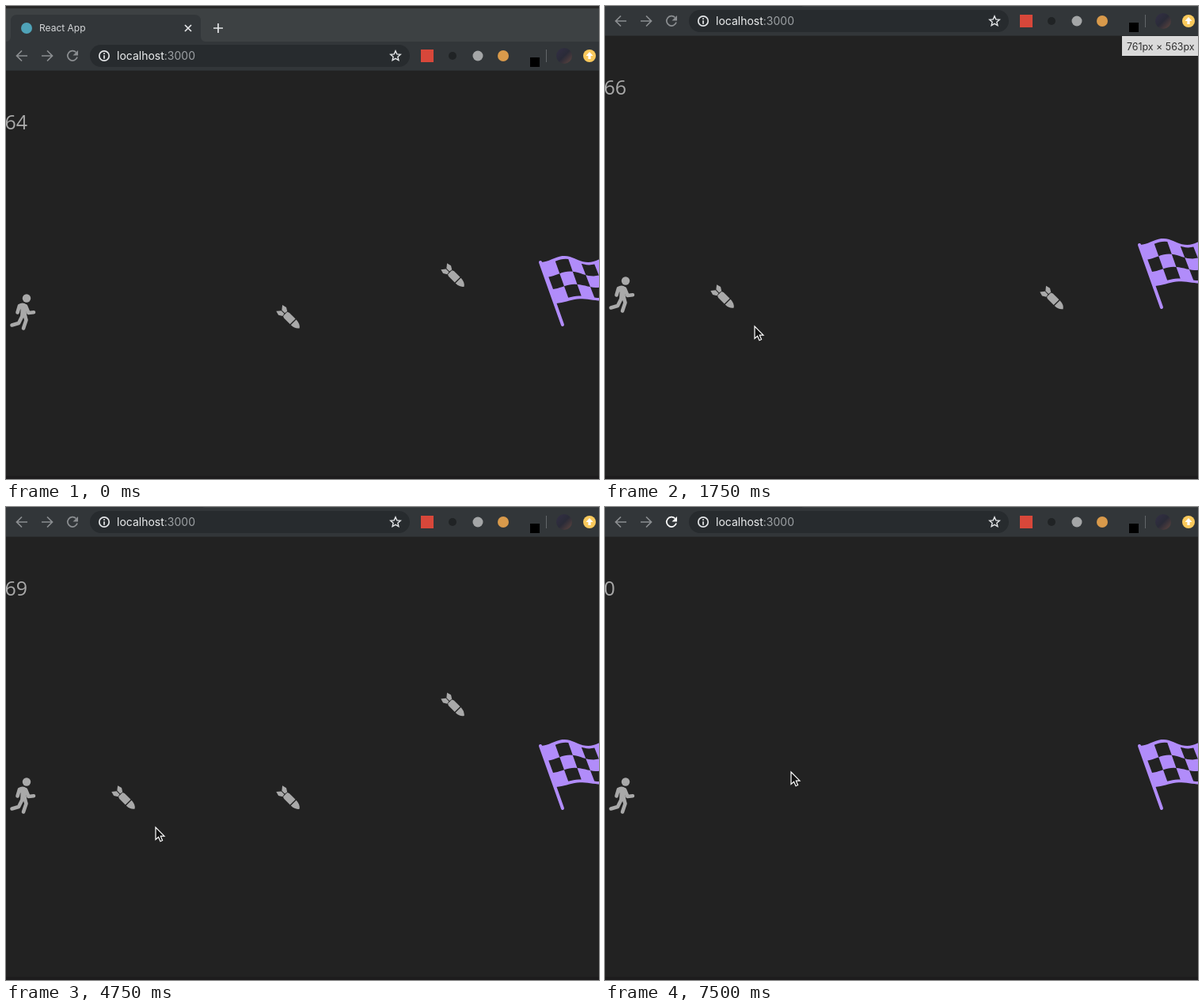
Recreate the animation shown at these times as an HTML page. Size 749 by 598 pixels, loop 8000 ms.

```html
<!DOCTYPE html>
<html>
<head>
<meta charset="utf-8">
<style>
  html, body { margin: 0; width: 100%; height: 100%; overflow: hidden; background: #222; }
  svg { display: block; width: 749px; height: 598px; }
  .ui { font-family: Inter, Roboto, sans-serif; }
  .line { fill: none; stroke: #8b8e91; stroke-width: 1.7; }
  .bright { stroke: #e4e6e8; }
  .limb { fill: none; stroke: #a9a9a9; stroke-width: 4.6; stroke-linecap: round; stroke-linejoin: round; }
</style>
</head>
<body>
<svg viewBox="0 0 749 598">
  <defs>
    <linearGradient id="photo" x2="1" y2="1">
      <stop offset="0" stop-color="#332f45"/>
      <stop offset=".5" stop-color="#2a2b38"/>
      <stop offset="1" stop-color="#61463f"/>
    </linearGradient>
    <g id="bomb" fill="#a9a9a9" transform="rotate(45)">
      <path id="fin" d="M-16-5.5L-10.5-7L-6-4.2L-6.6-.5H-12Z"/>
      <use href="#fin" transform="scale(1 -1)"/>
      <path d="M-5.5-3.6L-3-4.8H8V4.8H-3L-5.5 3.6Z"/>
      <path d="M9.4-4.8Q17-4.6 20 0Q17 4.6 9.4 4.8Z"/>
    </g>
  </defs>
  <rect width="749" height="598" fill="#222"/>
  <rect y="594" width="749" height="4" fill="#1d1c1d"/>

  <g id="game">
    <g id="bombs"></g>
    <g id="runner">
      <circle cx="26" cy="369.5" r="5.2" fill="#a9a9a9"/>
      <path d="M15.5 377.5Q21 373.5 26 377.5L25.500 385L26.500 393.500L18 394L18.500 384Z" fill="#a9a9a9"/>
      <path class="limb" stroke-width="4" d="M17 379L14.500 387.500M25 379.500L28.500 388L35 387.300M24 392L25.500 397L22 407.500M20 393L16 401L7.500 403.500"/>
    </g>
    <g id="flag" fill="#b18cfa">
      <path id="cloth"/>
      <path id="checks" fill="#222"/>
      <path d="M675 324L703 403" stroke="#b18cfa" stroke-width="4" stroke-linecap="round"/>
    </g>
  </g>

  <g id="page">
    <text id="score" x="-1.5" y="156" font-size="25" fill="#a9a9a9" font-family="'Open Sans', 'Noto Sans', sans-serif"></text>
    <g id="tip">
      <rect x="653" y="82" width="96" height="25" fill="#dadada"/>
      <text class="ui" x="659" y="99.500" font-size="12.400" fill="#303030">761px × 563px</text>
    </g>

    <rect width="749" height="46" fill="#3d4143"/>
    <rect id="edge" width="749" height="3" fill="#282828"/>
    <rect y="45" width="749" height="37" fill="#323639"/>
    <rect y="81" width="749" height="1" fill="#2b2e30"/>
    <path d="M0 45Q6 45 6 38V19Q6 11 14 11H238Q246 11 246 19V38Q246 45 252 45Z" fill="#323639"/>
    <circle cx="26" cy="28" r="7" fill="#4fa3b8"/>
    <text class="ui" x="42" y="32.300" font-size="12" fill="#d5d7d9">React App</text>
    <path class="line bright" d="M226 24L234 32M234 24L226 32M262 28H274M268 22V34" stroke-width="1.500"/>

    <path class="line" d="M27 63H14M20 56.500L13.500 63L20 69.500M45 63H58M52 56.500L58.500 63L52 69.500"/>
    <g id="reload">
      <path class="line" d="M88.500 58.500A6.200 6.200 0 1 0 90 64.500"/>
      <path d="M91 56V62.500H84.500Z"/>
    </g>
    <rect x="106" y="49" width="404" height="28" rx="14" fill="#272b2e"/>
    <circle class="line bright" cx="124" cy="63" r="6.200" stroke-width="1.500"/>
    <path class="line bright" d="M124 59.300V61M124 62.300V66.700"/>
    <text class="ui" x="140" y="68" font-size="14" fill="#eceeef">localhost<tspan fill="#9da1a4">:3000</tspan></text>
    <path id="star" class="line bright" style="stroke-width:1.400"/>

    <rect x="524" y="55" width="16" height="16" fill="#d8473a"/>
    <circle cx="564" cy="63" r="5" fill="#202325"/>
    <circle cx="596" cy="63" r="6.500" fill="#a4a6a7"/>
    <circle cx="628" cy="63" r="7" fill="#d99a4b"/>
    <rect x="662" y="65" width="12" height="12" fill="#000"/>
    <path d="M682.500 55V71" stroke="#63676a"/>
    <circle cx="705" cy="63" r="10" fill="url(#photo)"/>
    <circle cx="737" cy="63" r="8" fill="#f9c95c"/>
    <path d="M737 58L741.500 63H738.600V67H735.400V63H732.500Z" fill="#fff"/>
  </g>

  <path id="cursor" d="M0 0V15.500L3.600 12.200L6 17.700L8.600 16.500L6.300 11.200H11Z" fill="#111" stroke="#fff" stroke-width="1.200"/>
</svg>
<script>
const $ = id => document.getElementById(id);
const move = (el, x, y) => el.setAttribute('transform', `translate(${x} ${y})`);
const show = (el, on) => el.setAttribute('visibility', on ? 'visible' : 'hidden');

// Flag cloth: u counts columns away from the pole, v runs 0..1 down the pole.
function clothPoint(u, v) {
  const x = 676 + 16.5 * u;
  const wave = (4 - 2 * v) * Math.sin((x - 690) * Math.PI / 30);
  return `${(x + 19 * v).toFixed(1)} ${(320 - wave + (54 - u) * v).toFixed(1)}`;
}
function patch(u0, v0, u1, v1) {
  const n = Math.ceil((u1 - u0) * 5), top = [], bottom = [];
  for (let i = 0; i <= n; i++) {
    const u = u0 + (u1 - u0) * i / n;
    top.push(clothPoint(u, v0));
    bottom.unshift(clothPoint(u, v1));
  }
  return 'M' + top.concat(bottom).join('L') + 'Z';
}
const rows = [.07, .36, .66, .93];
let checks = '';
for (let c = 0; c < 5; c++)
  for (let r = 0; r < 3; r++)
    if ((c + r) % 2) checks += patch(c ? c : .15, rows[r], c + 1, rows[r + 1]);
$('cloth').setAttribute('d', patch(0, 0, 6, 1));
$('checks').setAttribute('d', checks);

const starPoints = Array.from({length: 10}, (_, i) => {
  const r = i % 2 ? 3 : 6.6, a = i * Math.PI / 5;
  return `${492 + r * Math.sin(a)} ${63.3 - r * Math.cos(a)}`;
});
$('star').setAttribute('d', 'M' + starPoints.join('L') + 'Z');

// Column x: drop times in seconds; a negative entry hides the column from that time.
const columns = [
  {x: 148.5, drops: [[.69, 1], [1.05, 1], [4.05, 1], [5.25, 0]]},
  {x: 356.5, drops: [[-.6, 1], [1.3, 0], [2.492, 1], [3.935, 1], [5.4, 0], [6.12, 1]]},
  {x: 564.5, drops: [[-.208, 1], [.375, 1], [2.935, 1], [4.593, 1], [5.995, 1]]}
];
for (const col of columns) {
  col.el = document.createElementNS('http://www.w3.org/2000/svg', 'use');
  col.el.setAttribute('href', '#bomb');
  $('bombs').append(col.el);
}
const reloadAt = 7;

// Damped spring, tension 120 and friction 14: 1 at the start, 0 at rest.
function spring(s) {
  const w = Math.sqrt(120 - 49);
  return Math.exp(-7 * s) * (Math.cos(w * s) + 7 / w * Math.sin(w * s));
}

function track(keys, t) {
  let i = 1;
  while (i < keys.length - 1 && t > keys[i][0]) i++;
  const a = keys[i - 1], b = keys[i];
  const k = Math.max(0, Math.min(1, (t - a[0]) / (b[0] - a[0])));
  return a.slice(1).map((v, j) => v + (b[j + 1] - v) * k);
}
const barKeys = [[0, 0], [.75, 0], [1.25, -44], [6.25, -44], [6.5, 0], [7, 0], [7.5, -44]];
const cursorKeys = [
  [0, 330, -25], [.25, 328, -20], [.75, 288, 186], [1.5, 189, 405], [5.75, 189, 405],
  [6.25, 233, 338], [6.5, 150, 35], [6.75, 83, 60], [7, 83, 60], [7.5, 235, 335]
];

function draw(t) {
  const [bar] = track(barKeys, t);
  move($('page'), 0, bar);
  move($('game'), 0, bar / 2);
  move($('cursor'), ...track(cursorKeys, t));
  show($('edge'), t < .25);
  show($('tip'), t >= 1.25 && t < 2.5);
  $('score').textContent = t < reloadAt ? 64 + Math.floor(t + .5) : 0;

  const hot = t >= 6.75;
  $('reload').firstElementChild.style.stroke = hot ? '#fff' : '#8b8e91';
  $('reload').lastElementChild.style.fill = hot ? '#fff' : '#8b8e91';

  for (const {x, drops, el} of columns) {
    const last = drops.filter(d => d[0] <= t).pop();
    const on = last && last[1] && t < reloadAt;
    show(el, on);
    if (on) move(el, x, 391 - 340 * spring(t - last[0]));
  }
}

let start;
function frame(now) {
  start ??= now;
  const step = Math.floor((now - start) % 8000 / 250);
  draw(Math.min(step, 30) / 4);
  requestAnimationFrame(frame);
}
draw(0);
requestAnimationFrame(frame);
</script>
</body>
</html>
```
